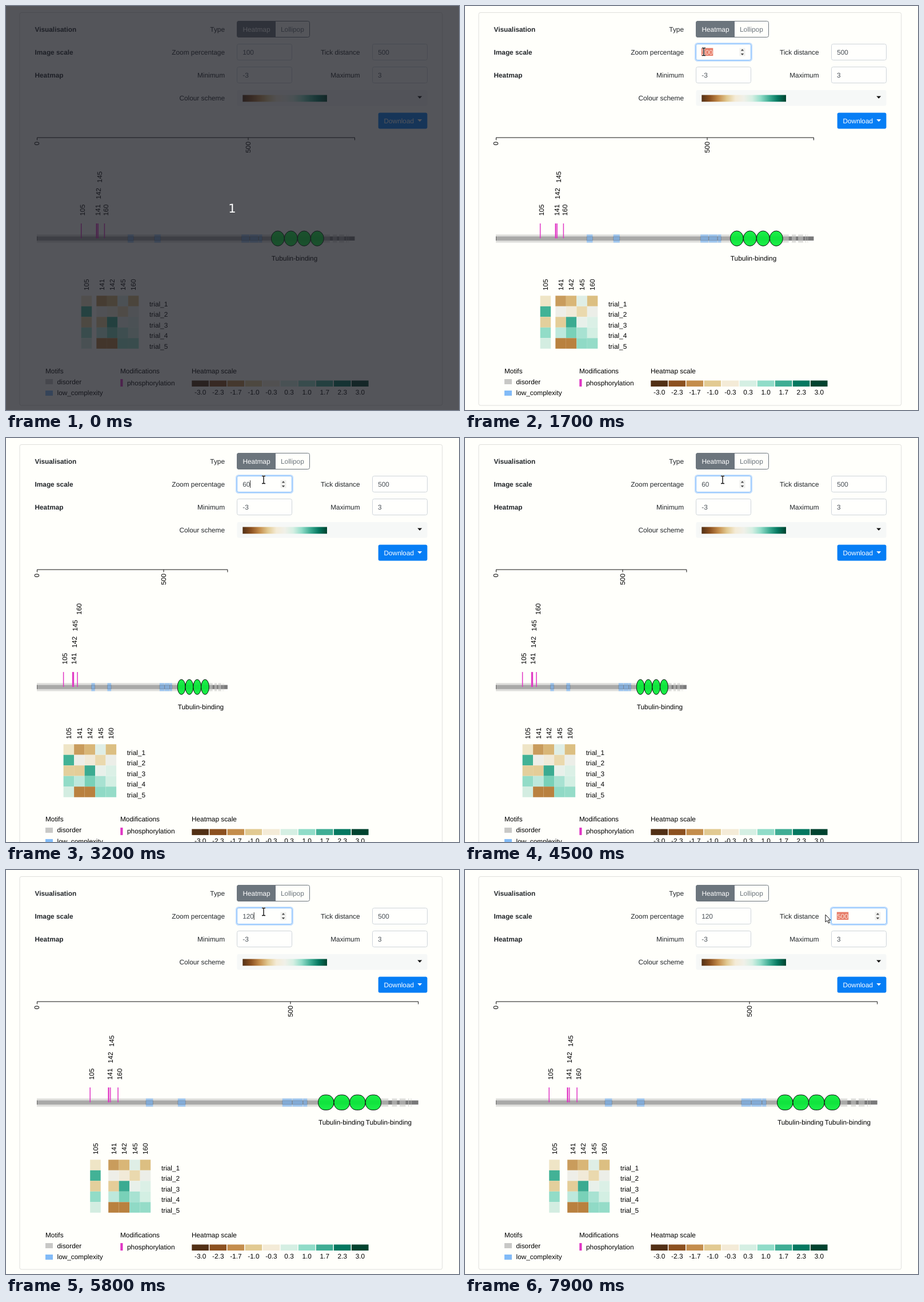
These frames come from a looping animation (793 by 706 pixels, 8 s). An HTML page:

```html
<!DOCTYPE html>
<html lang="en">
<head>
<meta charset="utf-8">
<title>Protein plot settings</title>
<style>
html, body { margin: 0; width: 100%; height: 100%; overflow: hidden; background: #fffffb; }
svg { display: block; width: 793px; height: 706px; }
text { font: 11.84px "Liberation Sans", Arial, sans-serif; text-rendering: geometricPrecision; white-space: pre; }
</style>
</head>
<body>
<svg viewBox="0 0 793 706" xmlns="http://www.w3.org/2000/svg">
  <defs><linearGradient id="scheme"></linearGradient></defs>
  <rect width="793" height="706" fill="#fffffb"/>
  <g id="chart"></g>
  <g id="form"></g>
  <g id="live"></g>
</svg>
<script>
const LOOP = 8000;
const AA = 0.74;          // pixels per residue at 100 %
const LEFT = 54;
const CELL = 18.5;
const LEVEL = 28.9;       // height of one row of residue labels
const DIGIT = 6.585;
const INK = '#212529', FIELD_INK = '#495057', PINK = '#e035c4';
const SCALE = ['#523015', '#8c5120', '#c48d4c', '#e2ca92', '#f4ebd7',
               '#d5efe3', '#90dcc8', '#3fad94', '#047860', '#00432f'];
const SITES = [105, 141, 142, 145, 160];
const HEAT = [
  '#efe5c6 #c99c5c #d9b677 #dfeee6 #dcbf82',
  '#42b296 #eeeee8 #f1ead8 #ead9ae #eceee8',
  '#e3cf9c #e4cd98 #3bab91 #e8f0ea #dbf0e6',
  '#92dcc7 #bde8dc #79d1b8 #a8e2d2 #d3efe3',
  '#d3ede1 #b9813f #b9813f #90dac6 #95dcc8'
].map(row => row.split(' '));
const DISORDER = [[0, 693], [700, 710], [715, 727], [732, 734], [737, 738.5]];
const LOW = [[215, 229], [278, 293], [484, 503], [504, 524], [525, 533]];
const DOMAINS = [0, 1, 2, 3].map(i => 554.5 + 31.1 * i);

// Timelines: [start in ms, value...]
const ZOOM = [[0, 1], [3200, 0.6], [5800, 1.2]];
const TYPED = [[0, '100'], [2600, '6'], [2700, '60'], [4600, '6'], [4700, ''],
               [5200, '1'], [5300, '12'], [5600, '120']];
const CARET = [[0, 0], [2600, 1], [3300, 0], [3900, 1], [4500, 0], [4600, 1],
               [5100, 0], [5200, 1], [6100, 0], [6700, 1], [7300, 0]];
const POINTER = [[0], [800, 470, 55], [900, 458, 79], [1100, 453, 71], [1300, 690, 72],
                 [1400, 460, 75], [1500, 382, 79], [1700, 418, 80], [1800, 430, 78],
                 [1900, 442, 75], [2000, 451, 73], [7000, 472, 80], [7100, 520, 87],
                 [7200, 578, 89], [7300, 645, 85], [7400, 670, 81], [7500, 684, 80],
                 [7800, 655, 80], [7900, 631, 78]];
const ZOOM_FIELD = 404.5, TICK_FIELD = 641.5;

const $ = id => document.getElementById(id);
const at = (line, t) => line.filter(key => key[0] <= t).pop();
const rect = (x, y, w, h, fill, more = '') =>
  `<rect x="${x}" y="${y}" width="${w}" height="${h}" fill="${fill}" ${more}/>`;
const path = (d, fill, more = '') => `<path d="${d}" fill="${fill}" ${more}/>`;
const text = (x, y, s, fill = '#000', anchor = 'start', more = '') =>
  `<text x="${x}" y="${y}" fill="${fill}" text-anchor="${anchor}" ${more}>${s}</text>`;
const upright = (x, y, s, anchor = 'start') =>
  text(0, 0, s, '#000', anchor, `transform="translate(${x} ${y}) rotate(-90)"`);
const dropMark = (x, y, fill) => path(`M${x - 4} ${y}h8l-4 4.2z`, fill);
const box = x => y => rect(x, y, 96, 28, '#fffffd', 'rx="3" stroke="#ced4da"');

function drawForm() {
  $('scheme').innerHTML = [...SCALE.slice(0, 5), '#f0f0e8', ...SCALE.slice(5)]
    .map((c, i) => `<stop offset="${i / 10}" stop-color="${c}"/>`).join('');
  const heading = (y, s) => text(50.5, y, s, INK, 'start', 'style="font-weight:bold"');
  const label = (x, y, s) => text(x, y, s, INK, 'end');
  $('form').innerHTML =
    heading(44.7, 'Visualisation') + heading(84.7, 'Image scale') + heading(124.5, 'Heatmap') +
    label(383, 44.7, 'Type') + label(383, 84.7, 'Zoom percentage') +
    label(383, 124.5, 'Minimum') + label(383, 164.5, 'Colour scheme') +
    label(619.5, 84.7, 'Tick distance') + label(619.5, 124.5, 'Maximum') +
    rect(404.5, 26.5, 127, 28, '#fffffb', 'rx="3" stroke="#6c757d"') +
    path('M407.5 26.5H471.5V54.5H407.5a3 3 0 0 1-3-3V29.5a3 3 0 0 1 3-3z', '#6c757d', 'stroke="#6c757d"') +
    text(414.5, 44.7, 'Heatmap', '#fff') + text(481, 44.7, 'Lollipop', '#6c757d') +
    [ZOOM_FIELD, TICK_FIELD].map(x => box(x)(66.5) + box(x)(106.5)).join('') +
    text(414.3, 124.5, '-3', FIELD_INK) + text(651, 124.5, '3', FIELD_INK) +
    rect(404.5, 147, 333, 27.5, '#f6f8f7', 'rx="3"') +
    rect(414.3, 155.5, 147.7, 11.8, 'url(#scheme)') + dropMark(724.3, 157.5, '#111') +
    rect(651.7, 186.5, 85.8, 28, '#067ef5', 'rx="3"') +
    text(661.5, 204.5, 'Download', '#fff') + dropMark(724.3, 198, '#fff');
}

// Lowest label row in which each site's label clears its neighbours
function labelRows(xs) {
  const ends = [];
  return xs.map(x => {
    let row = 0;
    while (ends[row] > x) row++;
    ends[row] = x + 13;
    return row;
  });
}

function drawChart(zoom) {
  const px = aa => LEFT + aa * AA * zoom;
  const end = px(752);
  const xs = SITES.map(px);
  const rows = labelRows(xs);
  const drop = (Math.max(...rows) - 2) * LEVEL;
  const span = ([a, b], y, h, fill, more) => rect(px(a), y, (b - a) * AA * zoom, h, fill, more);

  let s = path(`M54.5 234.5V230H${end}V234.5M${px(500)} 230V234.5`, 'none', 'stroke="#111"') +
    upright(58.3, 237, '0', 'end') + upright(px(500) + 4.3, 237, '500', 'end');

  let g = rect(LEFT, 402.7, end - LEFT, 7.2, '#7a7a7a');
  g += DISORDER.map(r => span(r, 399.3, 14.2, '#c8c8c6', 'opacity=".6"')).join('');
  g += LOW.map(r => span(r, 399.3, 14.2, '#7db8f8', 'opacity=".65"') +
    span(r, 403, 6.6, '#5080b8', 'fill-opacity=".15" stroke="#555" stroke-opacity=".35" stroke-width=".8"')).join('');
  g += rect(LEFT, 402.7, 1, 7.2, '#666');
  xs.forEach((x, i) => {
    g += path(`M${x} 380V406`, 'none', `stroke="${PINK}" stroke-width="1.5"`);
    g += upright(x + 6.5, 366.5 - rows[i] * LEVEL, SITES[i]);
  });
  let free = 0;
  DOMAINS.forEach(a => {
    const x = px(a);
    g += span([a, a + 31], 393, 26.4, '#00ea32',
      'fill-opacity=".9" stroke="#111" rx="11.6" ry="13.2"');
    if (x > free) {
      g += text(x + 0.5, 444.7, 'Tubulin-binding');
      free = x + 82;
    }
  });

  let right = 0;
  xs.forEach((x, col) => {
    x = Math.max(x, right);
    right = x + CELL;
    g += upright(x + 13.4, 497, SITES[col]);
    HEAT.forEach((row, r) => { g += rect(x, 506.3 + r * CELL, CELL, CELL, row[col]); });
  });
  HEAT.forEach((_, r) => { g += text(right + 18.7, 524.8 + r * CELL, 'trial_' + (r + 1)); });

  g += text(69, 641.5, 'Motifs') + text(200, 641.5, 'Modifications') + text(325, 641.5, 'Heatmap scale') +
    rect(69, 652, 13, 9, '#c8c8c6') + text(89.5, 660.6, 'disorder') +
    rect(69, 672, 13, 9, '#82bbf7') + text(89.5, 680.3, 'low_complexity') +
    rect(200.3, 652, 4.2, 13, PINK) + text(212, 662.6, 'phosphorylation');
  SCALE.forEach((c, i) => {
    const value = (-3 + i * 6 / 9).toFixed(1);
    g += rect(325.3 + 31.08 * i, 654.5, 29.6, 10.5, c) + text(340.2 + 31.08 * i, 678.8, value, '#000', 'middle');
  });

  const card = rect(24, 11.5, 739.7, 686.5 + drop, 'none', 'rx="3" stroke="#dfdfdc"');
  $('chart').innerHTML = card + s + `<g transform="translate(0 ${drop})">${g}</g>`;
}

function numberField(x, value, { focus, hover, selected, caret }) {
  const tx = x + 9.7;
  let s = '';
  if (focus) {
    s += rect(x - 1.4, 65.1, 98.8, 30.8, 'none', 'rx="4" stroke="#bfdcfd" stroke-width="2.4"') +
      rect(x, 66.5, 96, 28, '#fffffd', 'rx="3" stroke="#80bdff"');
  }
  if (selected) s += rect(tx - 0.3, 73.5, value.length * DIGIT + 0.6, 13.5, '#e67b68');
  s += text(tx, 84.5, value, selected ? '#fbe6dc' : FIELD_INK);
  if (caret) s += rect(tx + value.length * DIGIT - 0.2, 74, 0.9, 13, '#222');
  if (focus || hover) {
    const c = x + 81;
    s += rect(c - 5, 73.5, 10, 14, '#f0f0ee') +
      path(`M${c - 2.7} 78.3h5.4l-2.7-3zM${c - 2.7} 83h5.4l-2.7 3z`, '#444');
  }
  return s;
}

function cursor(x, y, inField) {
  if (!inField) {
    return path(`M${x} ${y}v13l3-2.7 2.3 4.7 2-1-2.2-4.4h3.9z`, '#fff', 'stroke="#111" stroke-linejoin="round"');
  }
  const d = `M${x - 3} ${y - 6.5}h2.2l.8 .8 .8-.8h2.2M${x} ${y - 6}V${y + 6}M${x - 3} ${y + 6.5}h2.2l.8-.8 .8 .8h2.2`;
  return path(d, 'none', 'stroke="#fff" stroke-width="3"') + path(d, 'none', 'stroke="#111" stroke-width="1.4"');
}

function drawLive(t) {
  const [, x, y] = at(POINTER, t);
  const over = left => x >= left && x <= left + 96 && y > 66 && y < 95;
  const overZoom = over(ZOOM_FIELD), overTick = over(TICK_FIELD);
  let s = numberField(ZOOM_FIELD, at(TYPED, t)[1], {
    focus: t >= 1700 && t < 7700, hover: overZoom,
    selected: t >= 1700 && t < 2600, caret: at(CARET, t)[1]
  });
  s += numberField(TICK_FIELD, '500', { focus: t >= 7700, hover: overTick, selected: t >= 7800 });
  if (x) s += cursor(x, y, overZoom || overTick);
  if (t < 500) {
    s += rect(0, 0, 793, 706, '#1b1d25', 'opacity=".75"') +
      text(396, 361, '1', '#fff', 'middle', 'style="font:21px \'DejaVu Sans\',sans-serif"');
  }
  return s;
}

let shownZoom, shownLive;
function render(t) {
  const zoom = at(ZOOM, t)[1];
  if (zoom !== shownZoom) drawChart(shownZoom = zoom);
  const live = drawLive(t);
  if (live !== shownLive) $('live').innerHTML = shownLive = live;
}

drawForm();
render(0);
const start = performance.now();
(function tick() {
  render((performance.now() - start) % LOOP);
  requestAnimationFrame(tick);
})();
</script>
</body>
</html>
```
